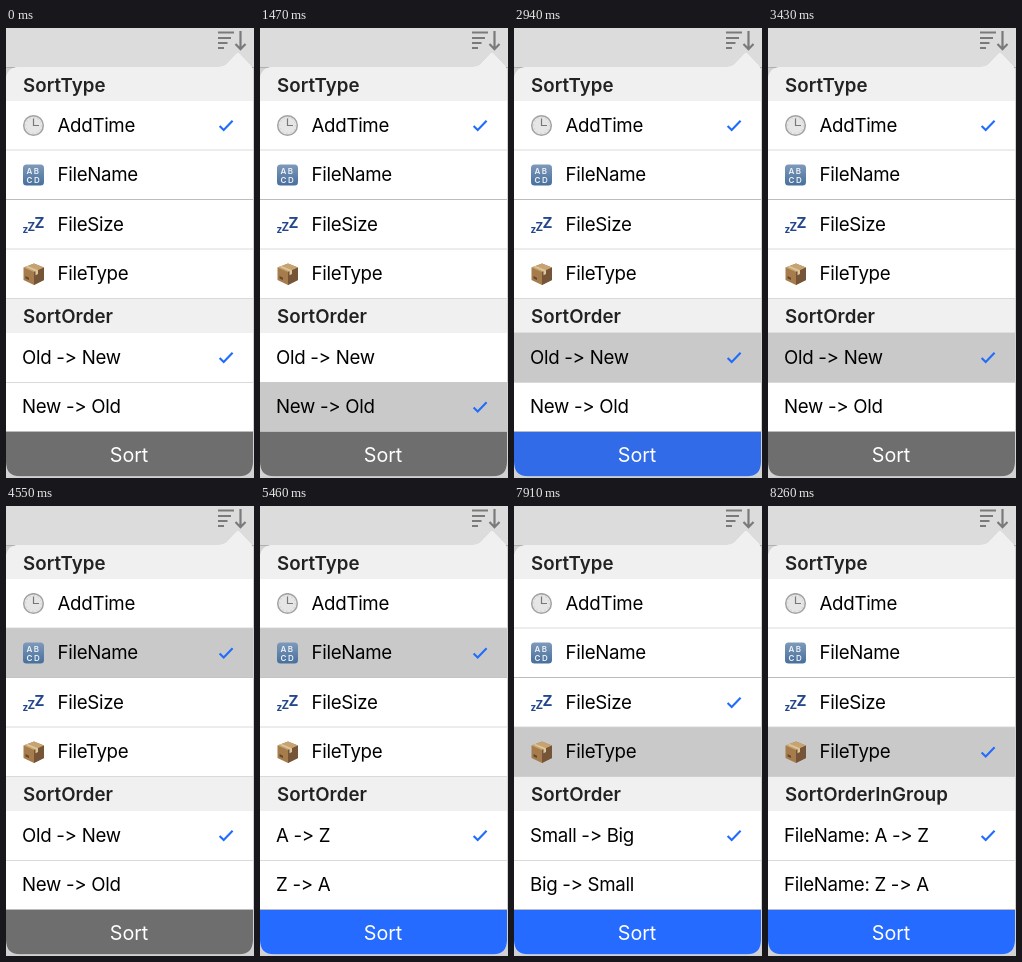
Write an HTML page that moves like this. It is 248x450 px and loops after 8470 ms.

```html
<!DOCTYPE html>
<html lang="en">
<head>
<meta charset="utf-8">
<title>Sort popover</title>
<style>
  html, body { margin: 0; width: 100%; height: 100%; overflow: hidden; background: #d8d8d8; }
  svg { display: block; width: 248px; height: 450px; }
  text {
    font: 18.7px Inter, "Liberation Sans", sans-serif;
    letter-spacing: -.3px;
    font-feature-settings: "calt" 0, "liga" 0;
    white-space: pre;
  }
  .header { font-weight: 600; letter-spacing: .07px; fill: #222; }
  .button { font-size: 19.8px; letter-spacing: -.1px; text-anchor: middle; fill: #fff; }
  .badge { font-size: 8px; font-weight: 600; letter-spacing: 1.5px; fill: #eef3f8; }
  .snooze { font-weight: 700; letter-spacing: 0; fill: #23468c; }
</style>
</head>
<body>
<svg viewBox="0 0 248 450">
  <defs>
    <clipPath id="panel">
      <path d="M0 53Q0 39 14 39H213Q218 39 221 36L230 26.500Q232 24 234 26.500L243 36Q247 39 247 45V434Q247 448.300 233 448.300H14Q0 448.300 0 434Z"/>
    </clipPath>
    <linearGradient id="badgeFill" x2="0" y2="1">
      <stop stop-color="#7f9aba"/>
      <stop offset="1" stop-color="#476f9c"/>
    </linearGradient>
    <path id="tick" d="M213.600 98L217.700 102.100L226.600 92.800" fill="none" stroke="#216dfb" stroke-width="2.100"/>
  </defs>

  <rect width="248" height="450" fill="#d2d2d2"/>
  <rect width="248" height="39" fill="#dcdcdc"/>
  <path d="M0 39.500H248" stroke="#b0b0b0"/>
  <g fill="none" stroke="#7a7a7a" stroke-width="2.200">
    <path d="M212 4.500H228M212 10H225M212 15H221.500M212 20H218"/>
    <path d="M234.500 3V21M229.500 16L234.500 21.200L239.500 16"/>
  </g>

  <g clip-path="url(#panel)">
    <rect y="20" width="247" height="430" fill="#fff"/>
    <rect y="20" width="247" height="53" fill="#f0f0f0"/>
    <rect y="270.500" width="247" height="34.500" fill="#f0f0f0"/>
    <path d="M0 122H247M0 221H247M0 270.500H247M0 354.500H247" stroke="#dadada"/>
    <path d="M0 171.500H247" stroke="#bcbcbc"/>
    <rect id="highlight" width="247" height="49.500" fill="#c9c9c9"/>
    <path d="M0 403.500H247" stroke="#bcbcbc"/>
    <rect id="button" y="404" width="247" height="46"/>
    <text class="button" x="123" y="433.700">Sort</text>
    <text class="header" x="17" y="63.600">SortType</text>

    <g id="clock">
      <circle cx="27.500" cy="97.500" r="9.800" fill="#e6e6e6" stroke="#a3a3a3" stroke-width="1.500"/>
      <circle cx="27.500" cy="97.500" r="7.800" fill="none" stroke="#c6c6c6" stroke-dasharray="1 3.080"/>
      <path d="M27.500 90.500V97.500H33" fill="none" stroke="#777" stroke-width="1.200"/>
    </g>
    <g id="letters">
      <rect x="17" y="136.500" width="21" height="21" rx="3.500" fill="url(#badgeFill)"/>
      <text class="badge" x="20.500" y="145.700">AB</text>
      <text class="badge" x="20.500" y="154.700">CD</text>
    </g>
    <g id="snooze">
      <text class="snooze" x="16.500" y="204.500" style="font-size:10px">z</text>
      <text class="snooze" x="21.500" y="202.500" style="font-size:11.500px">Z</text>
      <text class="snooze" x="28.500" y="199.500" style="font-size:15px">Z</text>
    </g>
    <g id="parcel">
      <path d="M17.500 239.500L28 235.500L38 239.500V252L28 257L17.500 252Z" fill="#a67c4d"/>
      <path d="M17.500 239.500L28 235.500L38 239.500L28 244Z" fill="#c7a372"/>
      <path d="M28 244L38 239.500V252L28 257Z" fill="#755437"/>
      <path d="M21.500 237.900L32 242.200V246L29.500 247.200V243.300L19.500 238.700Z" fill="#dcc79c"/>
      <path d="M19.500 248L23 249.700V252L19.500 250.500Z" fill="#64482f"/>
    </g>
    <g id="names"></g>
    <g id="before"></g>
    <g id="after"></g>
    <use id="typeTick" href="#tick"/>
    <use id="orderTick" href="#tick"/>
  </g>
</svg>
<script>
const LOOP = 8470, STEP = 70, FADE = 280;
const ROW = 49.5;
const rowTop = i => i < 4 ? 72.6 + ROW * i : 304.6 + ROW * (i - 4);
const byId = id => document.getElementById(id);

const byTime = ["SortOrder", "Old -> New", "New -> Old"];
const byName = ["SortOrder", "A -> Z", "Z -> A"];
const bySize = ["SortOrder", "Small -> Big", "Big -> Small"];
const byType = ["SortOrderInGroup", "FileName: A -> Z", "FileName: Z -> A"];

// A touch highlights its row; the pick moves the tick and starts the fade.
const states = [
  { touch: -1000, pick: -1000, row: -1, type: 0, order: 4, blue: 0, labels: byTime },
  { touch: 1400, pick: 1470, row: 5, type: 0, order: 5, blue: 1, labels: byTime },
  { touch: 2870, pick: 2870, row: 4, type: 0, order: 4, blue: 0, labels: byTime },
  { touch: 4550, pick: 4550, row: 1, type: 1, order: 4, blue: 1, labels: byName },
  { touch: 6020, pick: 6090, row: 2, type: 2, order: 4, blue: 1, labels: bySize },
  { touch: 7910, pick: 7980, row: 3, type: 3, order: 4, blue: 1, labels: byType }
];

function addText(parent, x, y, className) {
  const node = document.createElementNS("http://www.w3.org/2000/svg", "text");
  node.setAttribute("x", x);
  node.setAttribute("y", y);
  node.setAttribute("class", className);
  parent.append(node);
  return node;
}

["AddTime", "FileName", "FileSize", "FileType"].forEach((name, i) => {
  addText(byId("names"), 51.5, rowTop(i) + 31.2, "row").textContent = name;
});
for (const id of ["before", "after"]) {
  addText(byId(id), 17, 295, "header");
  addText(byId(id), 16, rowTop(4) + 31.2, "row");
  addText(byId(id), 16, rowTop(5) + 31.2, "row");
}

function setLabels(id, labels, opacity) {
  [...byId(id).children].forEach((node, i) => {
    if (node.textContent !== labels[i]) node.textContent = labels[i];
  });
  byId(id).setAttribute("opacity", opacity);
}

function setTick(id, row) {
  byId(id).setAttribute("y", rowTop(row) - rowTop(0));
}

const mix = (a, b, p) => a.map((v, i) => Math.round(v + (b[i] - v) * p));
const ease = p => p * p * (3 - 2 * p);
const GREY = [110, 110, 110], BLUE = [38, 107, 255];

function render(time) {
  const t = Math.floor((time % LOOP) / STEP) * STEP;
  const touched = states.findLast(s => t >= s.touch);
  const index = states.findLastIndex(s => t >= s.pick);
  const now = states[index], last = states[Math.max(0, index - 1)];
  const p = ease(Math.min(1, (t - now.pick) / FADE));

  byId("highlight").setAttribute("y", touched.row < 0 ? -100 : rowTop(touched.row));
  byId("button").setAttribute("fill", `rgb(${mix(GREY, BLUE, last.blue + (now.blue - last.blue) * p)})`);
  setTick("typeTick", now.type);
  setTick("orderTick", now.order);

  const changed = now.labels !== last.labels;
  setLabels("before", last.labels, changed ? 1 - p : 0);
  setLabels("after", now.labels, changed ? p : 1);
}

const start = performance.now();
function tick() {
  render(performance.now() - start);
  requestAnimationFrame(tick);
}
tick();
</script>
</body>
</html>
```
